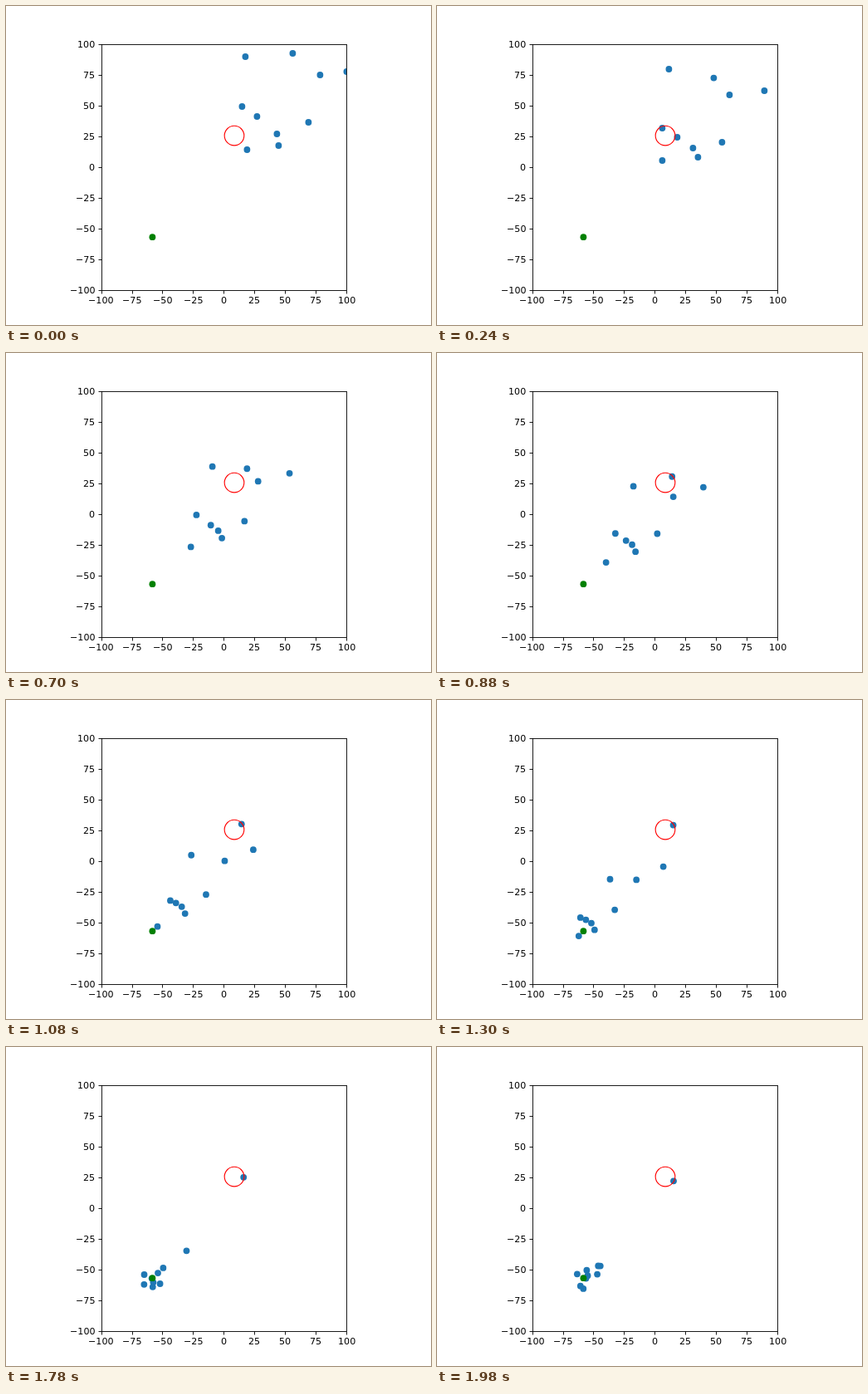
An HTML page with a canvas that plays this animation: 512 by 384 pixels, repeating every 2000 ms.

```html
<!DOCTYPE html>
<html>
<head>
<meta charset="utf-8">
<style>
html, body { margin: 0; width: 100%; height: 100%; overflow: hidden; background: #fff; }
canvas { display: block; }
</style>
</head>
<body>
<canvas id="stage" width="512" height="384"></canvas>
<script>
const c = document.getElementById('stage').getContext('2d');
const STEP = 20, COUNT = 100, LAUNCH = 12;
const LEFT = 114.56, TOP = 46.08, SIZE = 295.68, UNIT = SIZE / 200;
const GOAL = { x: 176.4, y: 278.2 };
const ROCK = { x: 275, y: 156.1, r: 8 * UNIT };
const SPEED = 2 * UNIT, PULL = 0.45, GAP = 9, PUSH = 0.3, FRICTION = 0.55;

// Each swarm member: where it starts and where its launch ends.
const swarm = [
  [288, 61, 279, 76], [345, 57, 333, 86.6], [378, 83, 352, 107], [410, 79, 394, 102],
  [284, 121, 271, 147], [302, 133, 289, 158], [364, 140, 343, 164], [326, 154, 308, 171],
  [328, 168, 314, 182], [290, 173, 271, 186]
].map(([x0, y0, x1, y1]) => ({ x0, y0, x1, y1, x: x0, y: y0, vx: 0, vy: 0 }));

// Unit vector and distance from a to b.
function toward(a, b) {
  const x = b.x - a.x, y = b.y - a.y, d = Math.hypot(x, y) || 1e-6;
  return { x: x / d, y: y / d, d };
}

// Speeds up evenly until the dot cruises straight at the goal.
function launch(p, i) {
  const dir = toward({ x: p.x1, y: p.y1 }, GOAL), left = LAUNCH - i;
  p.vx = dir.x * SPEED;
  p.vy = dir.y * SPEED;
  const ease = (left / LAUNCH) ** 2;
  p.x = p.x1 - p.vx * left + (p.x0 - p.x1 + p.vx * LAUNCH) * ease;
  p.y = p.y1 - p.vy * left + (p.y0 - p.y1 + p.vy * LAUNCH) * ease;
}

// Seeks the goal, keeps apart from neighbours, slides around the rock.
function steer(p) {
  const pull = toward(p, GOAL);
  p.vx += pull.x * PULL;
  p.vy += pull.y * PULL;
  for (const q of swarm) {
    const away = toward(q, p);
    if (q !== p && away.d < GAP) {
      p.vx += away.x * PUSH;
      p.vy += away.y * PUSH;
    }
  }
  const over = Math.max(1, Math.hypot(p.vx, p.vy) / SPEED);
  p.vx /= over;
  p.vy /= over;

  const out = toward(ROCK, p), inward = p.vx * out.x + p.vy * out.y;
  if (out.d < ROCK.r && inward < 0) {
    p.vx = (p.vx - out.x * inward) * FRICTION;
    p.vy = (p.vy - out.y * inward) * FRICTION;
  }
  p.x += p.vx;
  p.y += p.vy;
}

const poses = Array.from({ length: COUNT }, (_, i) => {
  for (const p of swarm) i <= LAUNCH ? launch(p, i) : steer(p);
  return swarm.map(p => [p.x + 0.4, p.y]);
});

const snap = v => Math.round(v) + 0.5;

function circle(x, y, r) {
  c.beginPath();
  c.arc(x, y, r, 0, 7);
}

function disc(x, y, color) {
  c.fillStyle = color;
  circle(x, y, 3.9);
  c.fill();
}

function line(x0, y0, x1, y1) {
  c.beginPath();
  c.moveTo(x0, y0);
  c.lineTo(x1, y1);
  c.stroke();
}

function axes() {
  const x0 = snap(LEFT), x1 = snap(LEFT + SIZE), y0 = snap(TOP), y1 = snap(TOP + SIZE);
  c.strokeStyle = c.fillStyle = '#000';
  c.lineWidth = 0.89;
  c.strokeRect(x0, y0, x1 - x0, y1 - y0);
  c.font = '11.11px "DejaVu Sans", sans-serif';
  for (let i = 0; i <= 8; i++) {
    const label = String(i * 25 - 100).replace('-', '\u2212');
    const width = c.measureText(label).width;
    const x = LEFT + SIZE * i / 8, y = TOP + SIZE * (1 - i / 8);
    line(snap(x), y1, snap(x), y1 + 4);
    line(x0, snap(y), x0 - 4, snap(y));
    c.fillText(label, Math.round(x - width / 2), 358);
    c.fillText(label, Math.round(107.5 - width), Math.round(y + 4));
  }
}

function draw(pose) {
  c.fillStyle = '#fff';
  c.fillRect(0, 0, 512, 384);

  c.save();
  c.beginPath();
  c.rect(LEFT, TOP, SIZE, SIZE);
  c.clip();
  for (const [x, y] of pose) disc(x, y, '#1f77b4');
  disc(GOAL.x, GOAL.y, '#008000');
  c.strokeStyle = '#f00';
  c.lineWidth = 1.11;
  circle(ROCK.x, ROCK.y, ROCK.r);
  c.stroke();
  c.restore();

  axes();
}

const start = performance.now();
function frame() {
  draw(poses[Math.floor((performance.now() - start) / STEP) % COUNT]);
  requestAnimationFrame(frame);
}
frame();
</script>
</body>
</html>
```
